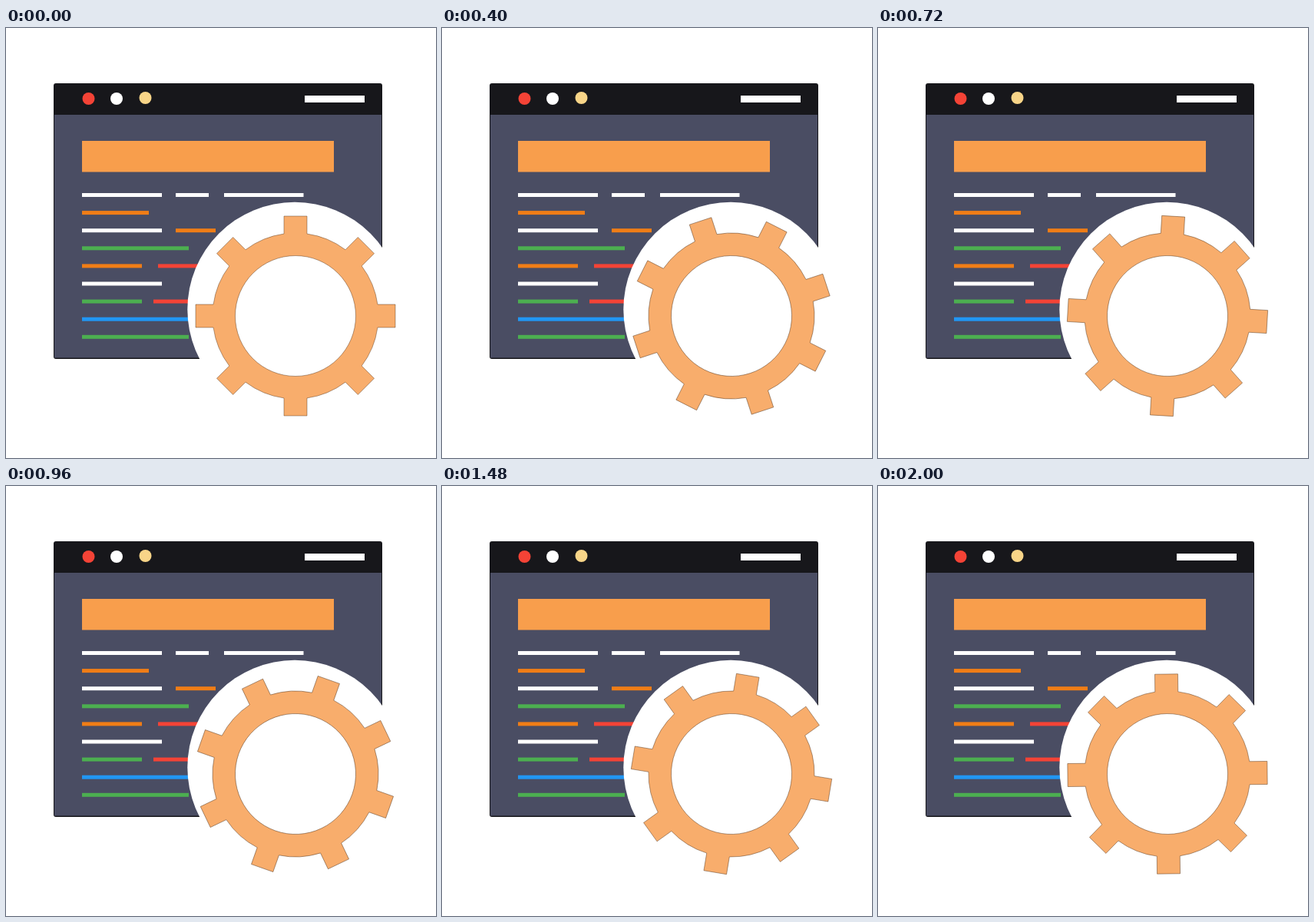
These frames come from a looping animation (560x560 px, 2.04 s). An HTML page with a canvas:

```html
<!DOCTYPE html>
<html>
<head>
<meta charset="utf-8">
<title>Code window with turning gear</title>
<style>
  html, body { margin: 0; width: 100%; height: 100%; overflow: hidden; background: #fff; }
  canvas { display: block; }
</style>
</head>
<body>
<canvas id="stage" width="560" height="560"></canvas>
<script>
const ctx = document.getElementById('stage').getContext('2d');
const LOOP = 2040, STEP = 40;
const DEG_PER_MS = 135 / 2010;
const WHITE = '#fff', RED = '#f44336', ORANGE = '#f07d16', GREEN = '#4caf50', BLUE = '#2196f3';

// Each row of code: [left, right, colour] per dash
const rows = [
  [[99, 203, WHITE], [221, 264, WHITE], [284, 387.5, WHITE]],
  [[99, 186, ORANGE]],
  [[99, 203, WHITE], [221, 273, ORANGE]],
  [[99, 238, GREEN]],
  [[99, 177, ORANGE], [198, 255, RED]],
  [[99, 203, WHITE]],
  [[99, 177, GREEN], [192, 245, RED]],
  [[99, 240, BLUE]],
  [[99, 238, GREEN]]
];

function rect(x, y, w, h, color) {
  ctx.fillStyle = color;
  ctx.fillRect(x, y, w, h);
}

function disc(x, y, r, color) {
  ctx.fillStyle = color;
  ctx.beginPath();
  ctx.arc(x, y, r, 0, 2 * Math.PI);
  ctx.fill();
}

function drawWindow() {
  ctx.fillStyle = '#17171b';
  ctx.beginPath();
  ctx.roundRect(62, 72, 428, 359, 3);
  ctx.fill();
  rect(63, 113, 426, 316.5, '#4a4d63');
  disc(107.5, 92, 8, RED);
  disc(144, 92, 8, WHITE);
  disc(181.5, 91, 8, '#f8d588');
  rect(389, 88, 78, 9, WHITE);
  rect(99, 147, 328, 40.5, '#f89e4c');
  rows.forEach((row, i) => {
    for (const [left, right, color] of row) {
      rect(left, 215 + i * 23.1, right - left, 5, color);
    }
  });
  disc(376, 366.5, 139.7, WHITE);
}

function drawGear(degrees) {
  const rim = 108, tip = 130, half = 15, hole = 78.5;
  const root = Math.asin(half / rim);
  ctx.save();
  ctx.translate(377, 375);
  ctx.rotate(degrees * Math.PI / 180);
  ctx.beginPath();
  for (let i = 0; i < 8; i++) {
    const a = i * Math.PI / 4, c = Math.cos(a), s = Math.sin(a);
    ctx.lineTo(tip * c + half * s, tip * s - half * c);
    ctx.lineTo(tip * c - half * s, tip * s + half * c);
    ctx.arc(0, 0, rim, a + root, a + Math.PI / 4 - root);
  }
  ctx.closePath();
  ctx.moveTo(hole, 0);
  ctx.arc(0, 0, hole, 0, 2 * Math.PI);
  ctx.fillStyle = '#f8ad6c';
  ctx.fill('evenodd');
  ctx.strokeStyle = 'rgba(70, 40, 15, 0.6)';
  ctx.lineWidth = 0.7;
  ctx.stroke();
  ctx.restore();
}

function draw() {
  const time = Math.floor(performance.now() % LOOP / STEP) * STEP;
  rect(0, 0, 560, 560, WHITE);
  drawWindow();
  drawGear(time * DEG_PER_MS);
  requestAnimationFrame(draw);
}
draw();
</script>
</body>
</html>
```
